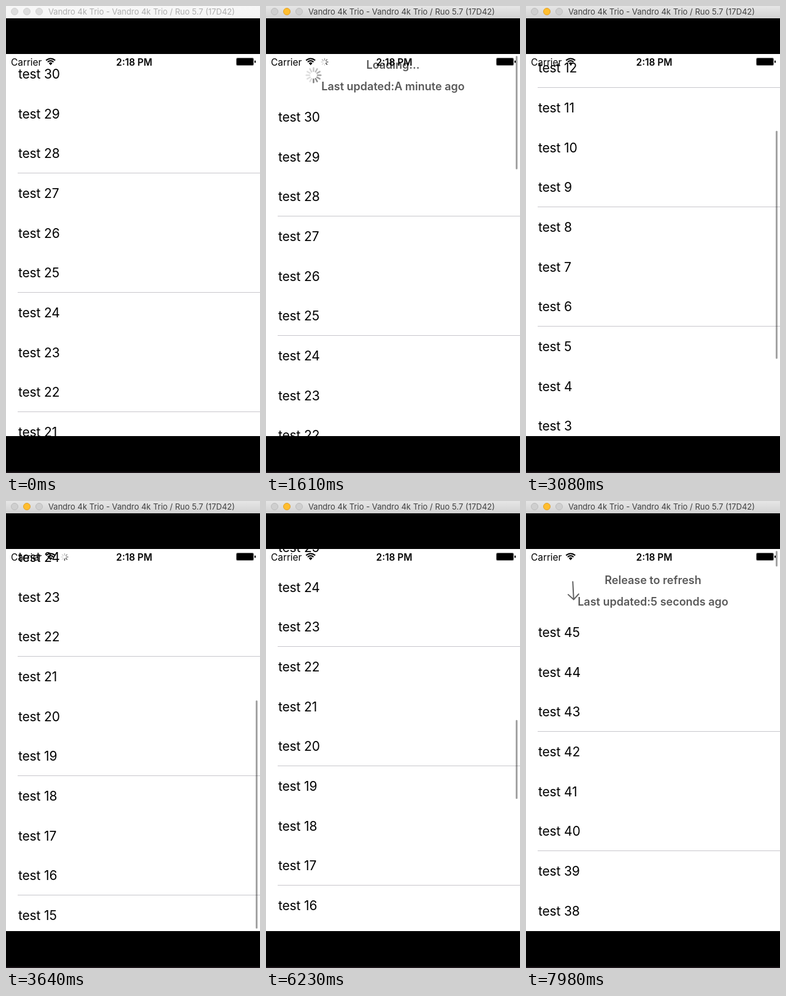
These frames come from a looping animation (414 px wide and 759 px high, 8 s). An HTML page with a canvas:

```html
<!DOCTYPE html>
<html lang="en">
<head>
<meta charset="utf-8">
<title>Pull to refresh list</title>
<style>
  html, body { margin: 0; width: 100%; height: 100%; overflow: hidden; background: #000; }
  canvas { display: block; width: 414px; height: 759px; }
</style>
</head>
<body>
<canvas id="stage" width="414" height="759"></canvas>
<script>
const ctx = document.getElementById('stage').getContext('2d');
const LOOP = 8000, STEP = 70;
const W = 414, TOP = 78, BOTTOM = 699, VIEW = BOTTOM - TOP;
const ROW = 194 / 3, HEADER = 70, FOOTER = 58, TRACK = 614, ARMED = 100;
const FONT = 'Inter, "Open Sans", sans-serif';
const DEVICE = 'Vandro 4k Trio';
const LABEL = { weight: 600, color: '#595959', align: 'center' };

// Each gesture eases the scroll offset from where the last one left it
const gestures = [
  { start: 420, end: 770, to: -135.7 },
  { start: 770, end: 1260, to: -HEADER },
  { start: 1940, end: 2240, to: 0, closing: true },
  { start: 2660, end: 3500, to: 407 },
  { start: 4200, end: 5010, to: 1378.2 },
  { start: 6160, end: 6700, to: 295.4 },
  { start: 6700, end: 7200, to: -30 },
  { start: 7200, end: 7420, to: 0 },
  { start: 7770, end: 8050, to: -122.1 }
];
const refresh = { start: 840, end: 1940, rows: 15 };
const loads = [refresh, { start: 3010, end: 3640, rows: 30 }, { start: 4830, end: 5600, rows: 45 }];
const busy = [...gestures.filter(g => !g.closing), ...loads];

const clamp = v => Math.max(0, Math.min(1, v));
const smooth = v => v * v * (3 - 2 * v);
const during = (span, t) => t >= span.start && t < span.end;

function offsetAt(t) {
  let off = 0;
  for (const g of gestures) {
    off += (g.to - off) * smooth(clamp((t - g.start) / (g.end - g.start)));
  }
  return Math.round(off * 3) / 3;
}

function rowCount(t) {
  return loads.reduce((rows, l) => t >= l.end ? l.rows : rows, 30);
}

function rect(x, y, w, h, color) {
  ctx.fillStyle = color;
  ctx.fillRect(x, y, w, h);
}

function pill(x, y, w, h, r, color) {
  ctx.fillStyle = color;
  ctx.beginPath();
  ctx.roundRect(x, y, w, h, r);
  ctx.fill();
}

function text(str, x, y, size, { weight = 400, color = '#000', align = 'left', track = 0 } = {}) {
  ctx.font = `${weight} ${size}px ${FONT}`;
  ctx.letterSpacing = track + 'px';
  ctx.textAlign = align;
  ctx.fillStyle = color;
  ctx.fillText(str, x, y);
}

function spinner(x, y, t, petals, inner, outer, width, dark) {
  const head = Math.floor(t / 1000 * petals) - Math.round(petals / 3);
  ctx.lineWidth = width;
  ctx.lineCap = 'round';
  for (let i = 0; i < petals; i++) {
    const a = (head - i) * 2 * Math.PI / petals;
    const c = Math.min(222, dark + i * (222 - dark) / (petals * 0.65));
    ctx.strokeStyle = `rgb(${c},${c},${c})`;
    ctx.beginPath();
    ctx.moveTo(x + inner * Math.cos(a), y + inner * Math.sin(a));
    ctx.lineTo(x + outer * Math.cos(a), y + outer * Math.sin(a));
    ctx.stroke();
  }
}

const bigSpinner = (y, t) => spinner(77.5, y, t, 12, 6.5, 11.8, 2.4, 125);

function arrow(x, y, angle) {
  ctx.save();
  ctx.translate(x, y);
  ctx.rotate(angle);
  ctx.strokeStyle = '#626262';
  ctx.lineWidth = 2;
  ctx.lineCap = 'round';
  ctx.beginPath();
  ctx.moveTo(0, -14.5);
  ctx.lineTo(0, 14.5);
  ctx.moveTo(-8.5, 6);
  ctx.lineTo(0, 14.5);
  ctx.lineTo(8.5, 6);
  ctx.stroke();
  ctx.restore();
}

function titleBar(active) {
  const g = ctx.createLinearGradient(0, 0, 0, 20);
  g.addColorStop(0, active ? '#e6e6e6' : '#f7f7f7');
  g.addColorStop(1, active ? '#d2d2d2' : '#f5f5f5');
  rect(0, 0, W, 20, g);
  for (let i = 0; i < 3; i++) {
    const lit = active && i === 1;
    ctx.beginPath();
    ctx.arc(14 + 20 * i, 9, 5.5, 0, 2 * Math.PI);
    ctx.fillStyle = lit ? '#ffbe2f' : active ? '#cfcfcf' : '#dddddd';
    ctx.fill();
    ctx.strokeStyle = lit ? '#e0a02a' : active ? '#bcbcbc' : '#d0d0d0';
    ctx.lineWidth = 1;
    ctx.stroke();
  }
  text(`${DEVICE} - ${DEVICE} / Ruo 5.7 (17D42)`, 69, 14, 13.05, { color: active ? '#404040' : '#aeaeae' });
}

function wifi(x, y) {
  const from = -Math.PI * 0.755, to = -Math.PI * 0.245;
  ctx.strokeStyle = ctx.fillStyle = '#000';
  ctx.lineCap = 'butt';
  ctx.lineWidth = 2;
  for (const r of [6.6, 10.3]) {
    ctx.beginPath();
    ctx.arc(x, y, r, from, to);
    ctx.stroke();
  }
  ctx.beginPath();
  ctx.moveTo(x, y + 0.5);
  ctx.arc(x, y, 4, from, to);
  ctx.fill();
}

function statusBar(t) {
  text('Carrier', 8, 96.5, 15.4);
  text('2:18 PM', 209, 96.5, 15.4, { weight: 600, align: 'center' });
  wifi(72.7, 95.7);
  pill(375, 84, 29, 13, 2.5, 'rgba(0,0,0,0.5)');
  pill(376, 85, 27, 11, 1.5, '#000');
  pill(405, 88.5, 2, 4, 1, '#000');
  // The system indicator lags behind the request
  const online = loads.some(l => t >= l.start + 2 * STEP && t < l.end + STEP);
  if (online) spinner(95.5, 91, t, 8, 3, 5.5, 1.5, 70);
}

function header(t, off) {
  const top = TOP - off, loading = during(refresh, t);
  const label = loading ? 'Loading...' : off < -ARMED ? 'Release to refresh' : 'Pull down to refresh';
  const ago = t < refresh.end ? 'A minute ago' : t < 3000 ? 'Just now' : '5 seconds ago';
  text(label, 207, top - 46.5, 18, LABEL);
  text('Last updated:' + ago, 207, top - 11.5, 18, LABEL);
  if (loading) bigSpinner(top - 35.5, t);
  else arrow(77, top - 35.3, -Math.PI * smooth(clamp((-off - ARMED) / 40)));
}

function list(t, off) {
  const count = rowCount(t), px = Math.round(off * 3);
  for (let i = Math.max(0, Math.floor(off / ROW) - 1); i < count; i++) {
    const y = TOP + i * ROW - off;
    if (y > BOTTOM) break;
    text('test ' + (count - i), 20, y + 40, 21, { track: -0.15 });
    // Hairlines of a 3x screen: only those on a sampled row survive
    if ((2 * (i + 1) - px) % 3 === 0) rect(19, Math.round(y + ROW - 1), W - 19, 1, '#c8c7cc');
  }
  if (off < 0) header(t, off);
  const end = TOP + count * ROW - off;
  if (end < BOTTOM && loads.some(l => during(l, t))) {
    text('Loading...', 207, end + 35.5, 18, LABEL);
    bigSpinner(end + 29, t);
  }
}

function scrollBar(t, off) {
  const span = busy.filter(s => t > s.start).sort((a, b) => a.end - b.end).pop();
  if (!span) return;
  const alpha = 1 - clamp((t - span.end - 60) / 200);
  const inset = during(refresh, t) ? HEADER : 0;
  // A reload reaches the indicator one step late
  const content = rowCount(t - STEP) * ROW + FOOTER + inset;
  const full = TRACK * VIEW / content;
  const over = Math.max(0, -off - inset);
  const y = 81 + clamp((off + inset) / (content - VIEW)) * (TRACK - full);
  pill(407, y, 3, Math.max(8, full - over), 1.5, `rgba(0,0,0,${0.36 * alpha})`);
}

function draw(t) {
  const off = offsetAt(t);
  rect(0, 0, W, 759, '#000');
  rect(0, 757, W, 2, '#1b1519');
  titleBar(t >= 490);
  ctx.save();
  ctx.beginPath();
  ctx.rect(0, TOP, W, VIEW);
  ctx.clip();
  rect(0, TOP, W, VIEW, '#fff');
  list(t, off);
  scrollBar(t, off);
  statusBar(t);
  ctx.restore();
}

const start = performance.now();
function tick() {
  const t = (performance.now() - start) % LOOP;
  draw(Math.floor(t / STEP) * STEP);
  requestAnimationFrame(tick);
}
tick();
</script>
</body>
</html>
```
